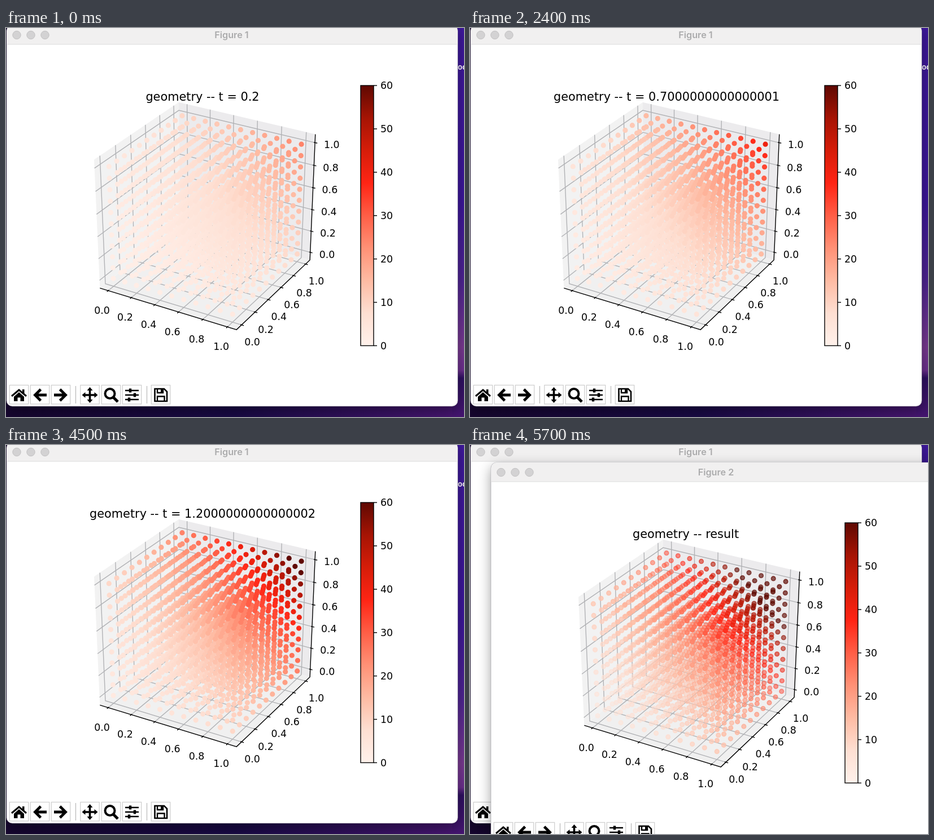
These frames come from a looping animation (811 by 690 pixels, 6.7 s). An HTML page:

```html
<!DOCTYPE html>
<html lang="en">
<head>
<meta charset="utf-8">
<title>Figure 1</title>
<style>
html, body { margin: 0; width: 100%; height: 100%; overflow: hidden; background: #16062f; }
svg { display: block; position: absolute; left: 0; top: 0; }
text { font-family: "DejaVu Sans", sans-serif; font-size: 17.36px; fill: #000; text-anchor: middle; }
.title { font-size: 20.83px; }
.bar { font: 600 16.2px Inter, sans-serif; fill: #ababac; }
.left { text-anchor: start; }
.desk { font: 700 13px Inter, sans-serif; fill: #fff; text-anchor: start; }
.frame { fill: #fff; stroke: #8a8790; stroke-opacity: .5; filter: drop-shadow(0 8px 11px rgba(0,0,0,.36)); }
.axis { fill: none; stroke: #000; stroke-width: 1.4; }
.grid { fill: none; stroke: #b1b2b5; stroke-width: 1.4; }
.button { fill: #fff; stroke: #d0d0d0; stroke-width: 1.3; }
.icon * { vector-effect: none; }
</style>
</head>
<body>
<svg id="stage" width="811" height="690" viewBox="0 0 811 690">
  <defs>
    <linearGradient id="side" x1="0" y1="0" x2="0" y2="1">
      <stop offset="0" stop-color="#3d1899"/>
      <stop offset=".45" stop-color="#3b1698"/>
      <stop offset=".65" stop-color="#4d2490"/>
      <stop offset=".82" stop-color="#78398f"/>
      <stop offset=".88" stop-color="#6a2f8c"/>
      <stop offset=".9" stop-color="#2d1060"/>
      <stop offset="1" stop-color="#451570"/>
    </linearGradient>
    <linearGradient id="floor">
      <stop offset="0" stop-color="#16062f"/>
      <stop offset=".5" stop-color="#190a45"/>
      <stop offset="1" stop-color="#481672"/>
    </linearGradient>
    <linearGradient id="reds" x1="0" y1="1" x2="0" y2="0"></linearGradient>
  </defs>
  <rect width="811" height="690" fill="url(#floor)"/>
  <rect x="790" width="21" height="690" fill="url(#side)"/>
  <text class="desk" x="800" y="74">oc</text>
</svg>
<script>
const LOOP = 6700, TICK = 300, RESULT_AT = 5700;
const STARTS = [0, 2, 3, 4, 6, 7, 9, 10, 11, 13, 14, 16, 17]; // ticks at which t = 0.2, 0.3, ... appears
const REDS = [[255, 241, 235], [254, 223, 210], [254, 187, 163], [255, 145, 118], [255, 94, 70],
  [255, 37, 21], [214, 29, 9], [166, 20, 4], [95, 9, 2]];
const TOP = 102, BOTTOM = 563.5, HALF = 0.5 + 0.5 / 24;

const stage = document.getElementById('stage');

function add(parent, tag, attrs, text) {
  const el = document.createElementNS('http://www.w3.org/2000/svg', tag);
  for (const k in attrs) el.setAttribute(k, attrs[k]);
  if (text !== undefined) el.textContent = text;
  return parent.appendChild(el);
}

function red(value) {
  const p = Math.min(Math.max(value / 60, 0), 1) * (REDS.length - 1);
  const i = Math.min(Math.floor(p), REDS.length - 2);
  return `rgb(${REDS[i].map((c, k) => Math.round(c + (REDS[i + 1][k] - c) * (p - i)))})`;
}

// Perspective camera: elevation 30, azimuth -60, distance 10.
const R3 = Math.sqrt(3) / 2;
const depth = ([x, y, z]) => R3 / 2 * x - R3 * R3 * y + z / 2;
function project(p) {
  const [x, y, z] = p, d = 10 - depth(p);
  return [355.2 + 2681 * (R3 * x + y / 2) / d, 326.2 - 2497 * (-x / 4 + R3 / 2 * y + R3 * z) / d];
}
const world = v => (v - 0.5) / 1.1;
const line = pts => 'M' + pts.map(p => project(p).map(n => n.toFixed(2)).join(' ')).join('L');

const points = [];
for (let i = 0; i < 1331; i++) {
  const ijk = [i % 11, Math.floor(i / 11) % 11, Math.floor(i / 121)];
  const pos = ijk.map(n => world(n / 10));
  points.push({ sum: (ijk[0] + ijk[1] + ijk[2]) / 10, depth: depth(pos), at: project(pos) });
}
points.sort((a, b) => a.depth - b.depth);
const near = points[points.length - 1].depth;

const solid = d => ({ d });
const stroke = (d, w) => ({ d, fill: 'none', stroke: '#000', 'stroke-width': w });
const ICONS = [
  [23, [stroke('M-13 2L0-9L13 2', 3), solid('M-9 3L0-5L9 3V11H2.5V4.5H-2.5V11H-9ZM6-10H9.5V-1L6-4Z')]],
  [60, [stroke('M12 0H-8M1.5-10L-8.5 0L1.5 10', 4.8)]],
  [97, [stroke('M-12 0H8M-1.5-10L8.5 0L-1.5 10', 4.8)]],
  [148.5, [stroke('M-10 0H10M0-10V10', 3.6),
    solid('M0-14L5-8H-5ZM0 14L5 8H-5ZM-14 0L-8-5V5ZM14 0L8-5V5Z')]],
  [186, [stroke('M6.5-2.5A8.5 8.5 0 1 1-10.5-2.5A8.5 8.5 0 1 1 6.5-2.5', 4), stroke('M4 4L12 12', 5)]],
  [223, [stroke('M-12-8H12M-12 0H12M-12 8H12', 2.4), stroke('M-3-11.5V-4.5M5-3.5V3.5M-5 4.5V11.5', 4.4)]],
  [274, [stroke('M-10.5-11H6L11-6V11H-10.5Z', 2.6), stroke('M-6-11V-4H4V-11', 2.4),
    stroke('M-6 11V2.5H6.5V11', 2.4), solid('M0-10H3V-5H0Z')]]
];

function toolbar(g) {
  for (const x of [123.5, 249.5]) add(g, 'path', { d: `M${x} 635V666`, stroke: '#adadad' });
  for (const [x, parts] of ICONS) {
    add(g, 'rect', { class: 'button', x: x - 16.7, y: 633.5, width: 33.4, height: 33.5 });
    const icon = add(g, 'g', { transform: `translate(${x} 651)` });
    for (const part of parts) add(icon, 'path', part);
  }
}

function label(g, text, x, y, cls = '') {
  add(g, 'text', { x, y: y + 6.3, class: cls }, text);
}

function axes(g) {
  const h = HALF;
  const pane = (fill, ...pts) => add(g, 'path', { fill, d: line(pts) + 'Z' });
  pane('#f2f2f2', [-h, -h, -h], [-h, h, -h], [-h, h, h], [-h, -h, h]);
  pane('#ecebed', [-h, h, -h], [h, h, -h], [h, h, h], [-h, h, h]);
  pane('#f0f0f0', [-h, -h, -h], [h, -h, -h], [h, h, -h], [-h, h, -h]);

  const ticks = [];
  for (let i = 0; i <= 5; i++) {
    const v = world(i / 5), name = (i / 5).toFixed(1), out = h + 1 / 60, into = h - 1 / 120;
    const grid = (...pts) => add(g, 'path', { class: 'grid', d: line(pts) });
    grid([v, -h, -h], [v, h, -h], [v, h, h]);
    grid([h, v, -h], [-h, v, -h], [-h, v, h]);
    grid([-h, -h, v], [-h, h, v], [h, h, v]);
    ticks.push([[v, -out, -h], [v, -into, -h]], [[out, v, -h], [into, v, -h]], [[out, h, v], [into, h, v]]);
    const mark = (p, dx, dy) => {
      const [x, y] = project(p);
      label(g, name, x + dx, y + dy);
    };
    mark([v, -h, -h], -11, 34.5);
    mark([h, v, -h], 19, 30.4);
    mark([h, h, v], 29.7, 3.8);
  }
  add(g, 'path', { class: 'axis', d: line([[-h, -h, -h], [h, -h, -h], [h, h, -h], [h, h, h]]) });
  add(g, 'path', { class: 'axis', d: ticks.map(line).join('') });
}

function colorbar(g) {
  add(g, 'rect', { class: 'axis', style: 'fill:url(#reds)', x: 628, y: TOP, width: 23, height: BOTTOM - TOP });
  for (let v = 0; v <= 60; v += 10) {
    const y = BOTTOM + (TOP - BOTTOM) * v / 60;
    add(g, 'path', { class: 'axis', d: `M651 ${y}h6` });
    label(g, v, 663, y, 'left');
  }
}

function figure(name, shift, titleX, shaded) {
  const g = add(stage, 'g', { transform: `translate(${shift} ${shift})` });
  add(g, 'rect', { class: 'frame', x: 1, y: -5, width: 799, height: 676, rx: 10 });
  add(g, 'path', { fill: '#f1f0f0', d: 'M1.5 29V5A10 10 0 0 1 11.5-5H789.5A10 10 0 0 1 799.5 5V29Z' });
  add(g, 'path', { d: 'M1.5 29H799.5', stroke: '#dcdbdc' });
  for (const cx of [19, 44, 69]) add(g, 'circle', { cx, cy: 12.5, r: 7.2, fill: '#d3d2d3', stroke: '#c1c0c1' });
  add(g, 'text', { class: 'bar', x: 399.5, y: 18 }, name);
  toolbar(g);
  axes(g);
  const dots = points.map(p => {
    const alpha = shaded ? 1 - 0.7 * (near - p.depth) / (2 * near) : 1;
    return add(g, 'circle', {
      cx: p.at[0].toFixed(2), cy: p.at[1].toFixed(2), r: 3.8, 'stroke-width': 1.6,
      'fill-opacity': alpha, 'stroke-opacity': alpha
    });
  });
  colorbar(g);
  const title = add(g, 'text', { class: 'title', x: titleX, y: 128.5 });
  return {
    g,
    set(t, text) {
      title.textContent = 'geometry -- ' + text;
      dots.forEach((dot, i) => {
        const c = red(Math.exp(points[i].sum + t));
        dot.setAttribute('fill', c);
        dot.setAttribute('stroke', c);
      });
    }
  };
}

REDS.forEach((c, i) => add(document.getElementById('reds'), 'stop',
  { offset: i / (REDS.length - 1), 'stop-color': `rgb(${c})` }));

const live = figure('Figure 1', 0, 348, false);
const result = figure('Figure 2', 36, 346, true);
result.set(1.5, 'result');

let shown = -1;
function draw(now) {
  const time = now % LOOP, tick = Math.floor(time / TICK);
  const step = STARTS.filter(s => s <= tick).length + 1;
  if (step !== shown) {
    shown = step;
    live.set(step * 0.1, 't = ' + step * 0.1);
  }
  result.g.style.display = time >= RESULT_AT ? '' : 'none';
}

const origin = performance.now();
function loop() {
  draw(performance.now() - origin);
  requestAnimationFrame(loop);
}
loop();
</script>
</body>
</html>
```
